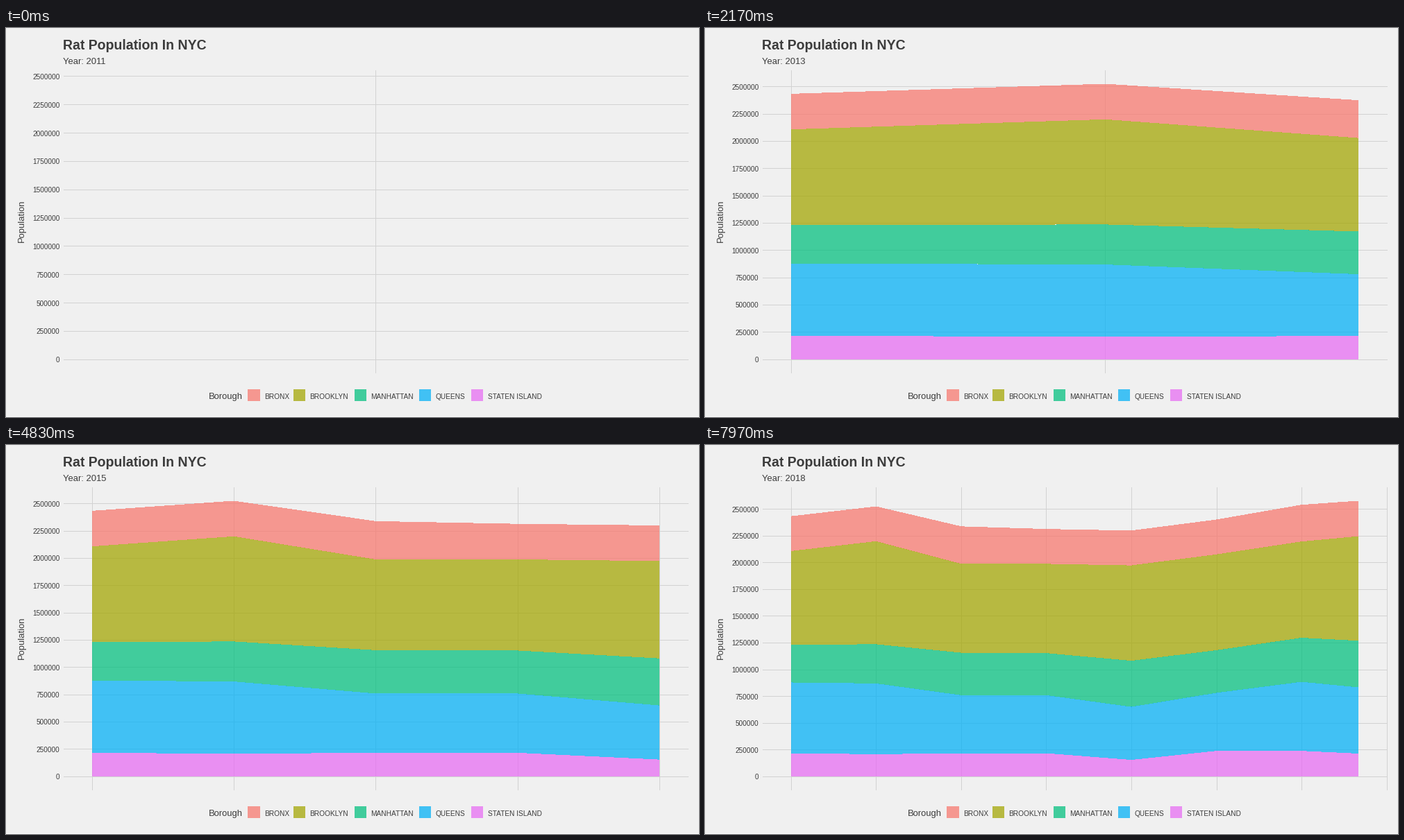
Animation, 998 px wide and 561 px high, one loop 8000 ms. Source, as a matplotlib script:

```python
import numpy as np
import matplotlib.pyplot as plt
from matplotlib.animation import FuncAnimation
from matplotlib.collections import LineCollection
from matplotlib.patches import Polygon, Rectangle

W, H, DPI = 998, 561, 64
PX = 72 / DPI
FRAMES, LOOP_MS = 240, 8000
FRAMES_PER_YEAR = 36

LEFT, RIGHT, TOP, BOTTOM = 83, 982, 61, 497
X0, X1 = 123.7, 940.9      # data range inside the panel
Y_ZERO, Y_MAX = 477.7, 80.5
BG, GRID, INK = "#F0F0F0", "#D2D2D2", "#3C3C3C"
ALPHA = 0.73
YEARS = np.arange(8)
BREAKS = np.arange(0, 2750000, 250000)


def series(base, trend=0, *shifts):
    """Millions per year: a straight trend, shifted over some spans of years."""
    values = base + trend * YEARS
    for first, last, amount in shifts:
        values = values + amount * ((YEARS >= first) & (YEARS <= last))
    return values


# name, colour, legend key x, population; top of the stack first
BOROUGHS = [
    ("BRONX", "#F8766D", 348.5,
     series(0.326, 0, (2, 2, 0.025), (6, 6, 0.018))),
    ("BROOKLYN", "#A3A500", 414,
     series(0.876, 0.004, (1, 1, 0.083), (2, 3, -0.053), (7, 7, 0.111))),
    ("MANHATTAN", "#00BF7D", 502,
     series(0.353, 0.0135, (2, 2, 0.017), (4, 4, 0.024), (5, 6, -0.022))),
    ("QUEENS", "#00B0F6", 595,
     series(0.662, 0, (2, 5, -0.119), (4, 4, -0.047), (6, 6, -0.016),
            (7, 7, -0.056))),
    ("STATEN ISLAND", "#E76BF3", 670,
     series(0.215, 0, (1, 1, -0.009), (4, 4, -0.062), (5, 6, 0.022),
            (7, 7, -0.015))),
]
POPULATION = np.array([b[3] for b in BOROUGHS])
TOPS = np.cumsum(POPULATION[::-1], axis=0)[::-1].T

plt.rcParams["font.family"] = "Liberation Sans"
fig = plt.figure(figsize=(W / DPI, H / DPI), dpi=DPI, facecolor="white")
ax = fig.add_axes([0, 0, 1, 1])
ax.set_xlim(0, W)
ax.set_ylim(H, 0)
ax.axis("off")
ax.add_patch(Rectangle((0, 0), W, H - 1, fc=BG, lw=0, zorder=0))


def label(x, y, text, size, **kw):
    kw.setdefault("va", "baseline")
    return ax.text(x, y, text, fontsize=size * PX, color=INK, **kw)


label(82, 31, "Rat Population In NYC", 19.5, weight="bold")
year_text = label(82.5, 52, "", 13)
label(28.7, 278.3, "Population", 13, rotation=90, ha="right", va="center")
label(292, 535.5, "Borough", 13)

areas = []
for name, colour, key_x, _ in BOROUGHS:
    ax.add_patch(Rectangle((key_x, 520.5), 17.3, 17.3, fc=colour, lw=0,
                           alpha=ALPHA))
    label(key_x + 23.6, 534.6, name, 10.15)
    area = Polygon([(0, 0)], closed=True, fc=colour, lw=0, alpha=ALPHA,
                   antialiased=False, zorder=2)
    areas.append(ax.add_patch(area))

grid = LineCollection([], colors=GRID, linewidths=PX, antialiaseds=False,
                      zorder=1)
ax.add_collection(grid)
ticks = [label(77.4, 0, str(b), 10, ha="right") for b in BREAKS]


def elapsed_years(frame):
    # the reveal skips one step late in the run
    return (frame + (frame >= 176)) / FRAMES_PER_YEAR


def revealed(t):
    """Years and stacked tops up to time t, with the moving front last."""
    front = [np.interp(t, YEARS, col) for col in TOPS.T]
    done = YEARS < t
    return np.append(YEARS[done], t), np.vstack([TOPS[done], front])


def draw(frame):
    t = elapsed_years(frame)
    years, tops = revealed(t)
    unit = (Y_ZERO - Y_MAX) / tops[:, 0].max()

    def to_x(year):
        return X0 + (X1 - X0) * year / t if t else (LEFT + RIGHT) / 2

    rows = Y_ZERO - BREAKS / 1e6 * unit
    lines = [[(LEFT, y), (RIGHT, y)] for y in rows]
    for year in YEARS if t else YEARS[:1]:
        x = to_x(year)
        if x <= RIGHT + 0.5:
            lines.append([(x, TOP), (x, BOTTOM)])
    grid.set_segments(lines)
    for tick, y in zip(ticks, rows):
        tick.set_y(y + 4.5)

    # unsmoothed fills grow to whole pixels, so inset each side by half a pixel
    xs = np.array([to_x(year) for year in years])
    xs[0] += 0.5
    xs[-1] -= 0.5
    edges = Y_ZERO - unit * np.column_stack([tops, np.zeros(len(years))])
    for i, area in enumerate(areas):
        upper = np.column_stack([xs, edges[:, i] + 0.5])
        lower = np.column_stack([xs, edges[:, i + 1] - 0.5])[::-1]
        area.set_xy(np.vstack([upper, lower]))
        area.set_visible(t > 0)

    year_text.set_text(f"Year: {round(2011 + t)}")
    return [grid, year_text, *ticks, *areas]


anim = FuncAnimation(fig, draw, frames=FRAMES, init_func=lambda: draw(0),
                     interval=LOOP_MS / FRAMES, repeat=True, repeat_delay=0)
plt.show()
```
